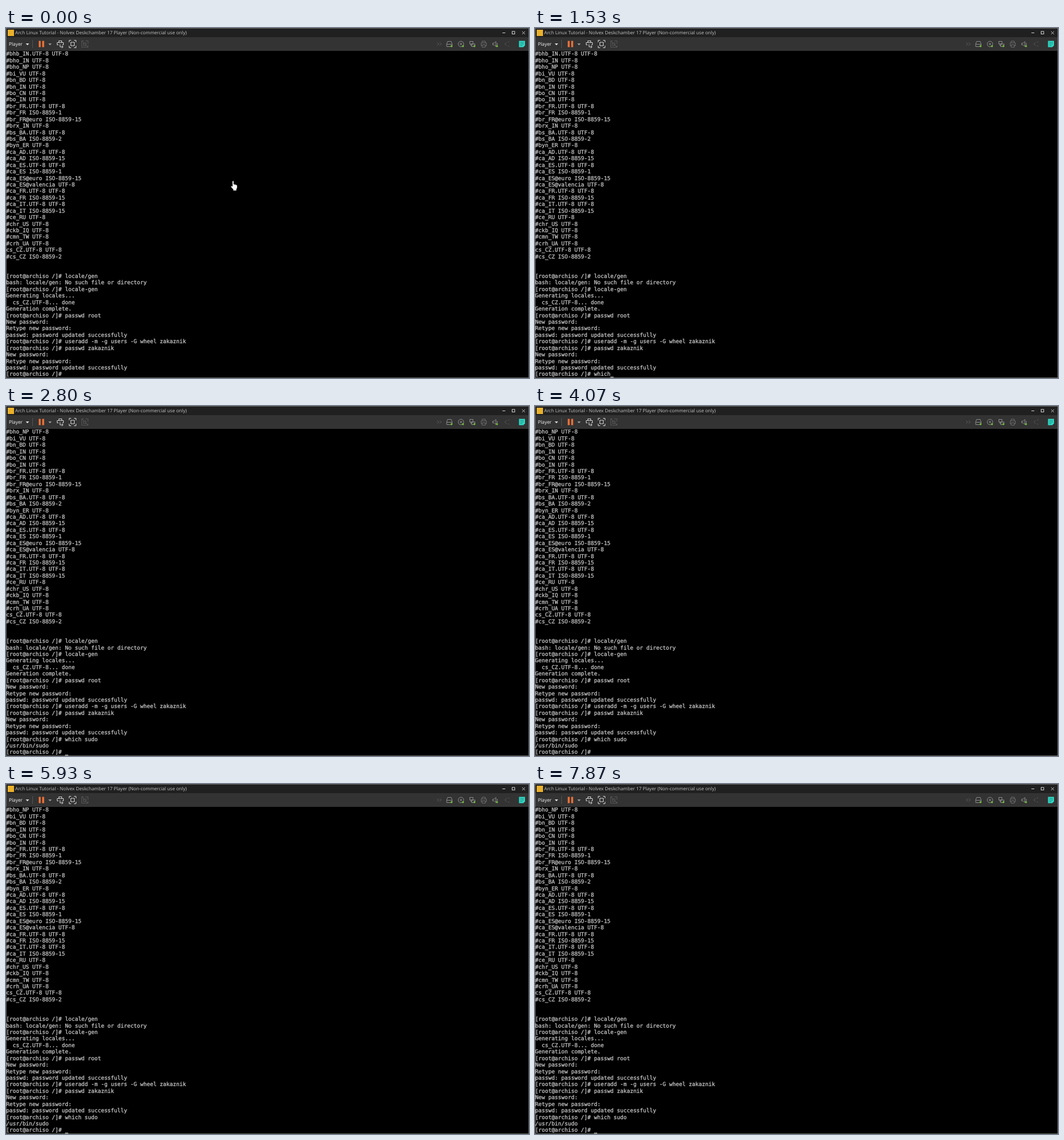
Recreate the animation shown at these times as an HTML page. Size 915x612 px, loop 8 s.

```html
<!DOCTYPE html>
<html lang="en">
<head>
<meta charset="utf-8">
<title>Terminal session</title>
<style>
  html, body { margin: 0; width: 100%; height: 100%; overflow: hidden; background: #000; }
  svg { display: block; }
  text { text-rendering: geometricPrecision; white-space: pre; }
  .ui { font-family: "Open Sans", "Noto Sans", sans-serif; }
  #rows { font: 9.5px "DejaVu Sans Mono", monospace; fill: #c4c4c4; stroke: #c4c4c4; stroke-width: .3; }
  .line { fill: none; stroke: #d6d6d6; stroke-width: 1; }
  .dim { fill: none; stroke: #8c8c8c; stroke-width: 1; }
  .off { fill: none; stroke: #565656; stroke-width: 1; }
</style>
</head>
<body>
<svg width="915" height="612" viewBox="0 0 915 612">
  <rect width="915" height="612" fill="#000"/>
  <rect width="915" height="16" fill="#202020"/>
  <rect y="16" width="915" height="24" fill="#333"/>

  <!-- title bar -->
  <rect x="3" y="3" width="11" height="11" fill="#e9b02c"/>
  <text class="ui" x="16" y="11.4" font-size="8.2" fill="#c4c4c4">Arch Linux Tutorial - Nolvex Deskchamber 17 Player (Non-commercial use only)</text>
  <g class="line">
    <path d="M868.5 8.5h5"/>
    <rect x="885.5" y="6" width="4.5" height="4.5"/>
    <path d="M903 6l5 5m0-5l-5 5" stroke-width=".9"/>
  </g>

  <!-- toolbar, left -->
  <text class="ui" x="5" y="31" font-size="8.3" fill="#f4f4f4">Player</text>
  <path d="M34.5 27h6l-3 3.2z" fill="#e0e0e0"/>
  <path d="M46.5 21v14" stroke="#555"/>
  <path d="M57.3 22.5h3.4v11h-3.4zM63.3 22.5h3.4v11h-3.4z" fill="#ec733a"/>
  <path d="M74 27h6l-3 3.2z" fill="#999"/>
  <g class="line">
    <rect x="92.5" y="22.5" width="5" height="3"/>
    <path d="M92 29.500h-2.500v-4h11v4h-2M94.500 28.500v4.500h5M97.500 31l2.500 2-2.500 2"/>
    <path d="M110.5 25v-3.500h3.500M119 21.500h3.500v3.500M122.500 31v3.500h-3.500M114 34.500h-3.500v-3.500"/>
    <rect x="113.500" y="25" width="6" height="6"/>
  </g>
  <g class="off">
    <path d="M136 22.500h-3.500v11h11v-3M139 22.500h4.500v5M132.500 22.500l11 11"/>
    <rect x="135.500" y="26" width="4.500" height="4.500"/>
  </g>

  <!-- toolbar, right -->
  <path class="off" d="M754 25.500l3.500 2.500-3.500 2.500M758.500 25.500l3.500 2.500-3.500 2.500"/>
  <g class="dim">
    <path d="M771 28l1.500-4.500h6.500l1.500 4.500v4.500h-9.500zM771 28.500h9.500"/>
    <circle cx="796" cy="28" r="4.800"/><circle cx="796" cy="28" r="1.300"/>
    <rect x="811.500" y="23.500" width="5.500" height="4.500"/>
    <rect x="815" y="28" width="5.500" height="4.500"/>
    <path d="M813.500 28v3h1.500"/>
    <path d="M833 26v-3h5.500v3M833 31h-1.700v-5h9.200v5h-1.700M833 29.500h5.500v4h-5.500z" stroke="#6c6c6c"/>
    <path d="M851.500 26.500h2.500l3-3v9l-3-3h-2.500zM859 26q1.500 2 0 4"/>
  </g>
  <g fill="#72b83c">
    <circle cx="779.500" cy="31.700" r="1.800"/>
    <circle cx="799.500" cy="31.700" r="1.800"/>
    <circle cx="819.500" cy="31.700" r="1.800"/>
    <circle cx="859" cy="31.700" r="1.800"/>
  </g>
  <path class="off" d="M876 25l-3.500 3 3.500 3M878 25l2.500-1M878 31l2.500 1"/>
  <path d="M897.500 22.500h10.500v8l-3 3h-7.500z" fill="#2fd6c3"/>
  <path d="M899.500 25.500h6.500M899.500 28h6.500M899.500 30.500h4" stroke="#1b7d73" stroke-width=".8"/>

  <g id="rows"></g>
  <rect id="caret" y="609.800" width="5.700" height="1.400" fill="#c4c4c4"/>
  <rect x=".5" y=".5" width="914" height="611" fill="none" stroke="#626262"/>

  <!-- hand pointer -->
  <path id="hand" transform="translate(393 267)" fill="#fff" stroke="#111" stroke-width=".7" stroke-linejoin="round"
    d="M3 1.500q0-1.300 1.200-1.300t1.300 1.300v4.500l4.200 1q1.800.5 1.800 2.200v3.300l-1.300 2.800v2.200h-5.700v-2l-3.600-4.300q-1-1.500.2-2t2 .9z"/>
</svg>
<script>
const LOOP = 8000, COL = 915 / 160, ROW = 11.43, ROWS = 50;
const prompt = "[root@archiso /]# ";
const command = "which sudo";
const scrollAt = 2800, handGone = 870;

const history = `#bhb_IN.UTF-8 UTF-8
#bho_IN UTF-8
#bho_NP UTF-8
#bi_VU UTF-8
#bn_BD UTF-8
#bn_IN UTF-8
#bo_CN UTF-8
#bo_IN UTF-8
#br_FR.UTF-8 UTF-8
#br_FR ISO-8859-1
#br_FR@euro ISO-8859-15
#brx_IN UTF-8
#bs_BA.UTF-8 UTF-8
#bs_BA ISO-8859-2
#byn_ER UTF-8
#ca_AD.UTF-8 UTF-8
#ca_AD ISO-8859-15
#ca_ES.UTF-8 UTF-8
#ca_ES ISO-8859-1
#ca_ES@euro ISO-8859-15
#ca_ES@valencia UTF-8
#ca_FR.UTF-8 UTF-8
#ca_FR ISO-8859-15
#ca_IT.UTF-8 UTF-8
#ca_IT ISO-8859-15
#ce_RU UTF-8
#chr_US UTF-8
#ckb_IQ UTF-8
#cmn_TW UTF-8
#crh_UA UTF-8
cs_CZ.UTF-8 UTF-8
#cs_CZ ISO-8859-2


${prompt}locale/gen
bash: locale/gen: No such file or directory
${prompt}locale-gen
Generating locales...
  cs_CZ.UTF-8... done
Generation complete.
${prompt}passwd root
New password:
Retype new password:
passwd: password updated successfully
${prompt}useradd -m -g users -G wheel zakaznik
${prompt}passwd zakaznik
New password:
Retype new password:
passwd: password updated successfully`.split("\n");

// Time of each key press, and of each caret toggle (starting hidden)
const keys = [870, 1000, 1130, 1270, 1400, 1670, 1800, 1930, 2030, 2130];
const blinks = [70, 270, 470, 670, 870, 2270, 2470, 2670, 2800,
  3000, 3200, 3330, 3530, 3730, 3870, 4070, 4330, 4470, 4730, 4930, 5130, 5330,
  5530, 5730, 5930, 6130, 6330, 6530, 6730, 6930, 7130, 7330, 7530, 7730, 7870];

const passed = (times, t) => times.filter(x => x <= t).length;
const byId = id => document.getElementById(id);
const caret = byId("caret"), hand = byId("hand");

const rows = Array.from({ length: ROWS }, (_, i) => {
  const el = document.createElementNS("http://www.w3.org/2000/svg", "text");
  el.setAttribute("x", 0.3);
  el.setAttribute("y", 48.4 + i * ROW);
  byId("rows").append(el);
  return el;
});

let shown = "";
function draw(t) {
  const done = t >= scrollAt;
  const typed = command.slice(0, passed(keys, t));
  const state = typed + done;
  if (state !== shown) {
    const lines = [...history, prompt + typed];
    if (done) lines.push("/usr/bin/sudo", prompt);
    lines.slice(-ROWS).forEach((line, i) => rows[i].textContent = line);
    shown = state;
  }
  caret.setAttribute("x", (prompt.length + (done ? 0 : typed.length)) * COL + 0.3);
  caret.style.visibility = passed(blinks, t) % 2 ? "visible" : "hidden";
  hand.style.visibility = t < handGone ? "visible" : "hidden";
}

const start = performance.now();
function tick() {
  draw((performance.now() - start) % LOOP);
  requestAnimationFrame(tick);
}
draw(0);
requestAnimationFrame(tick);
</script>
</body>
</html>
```
